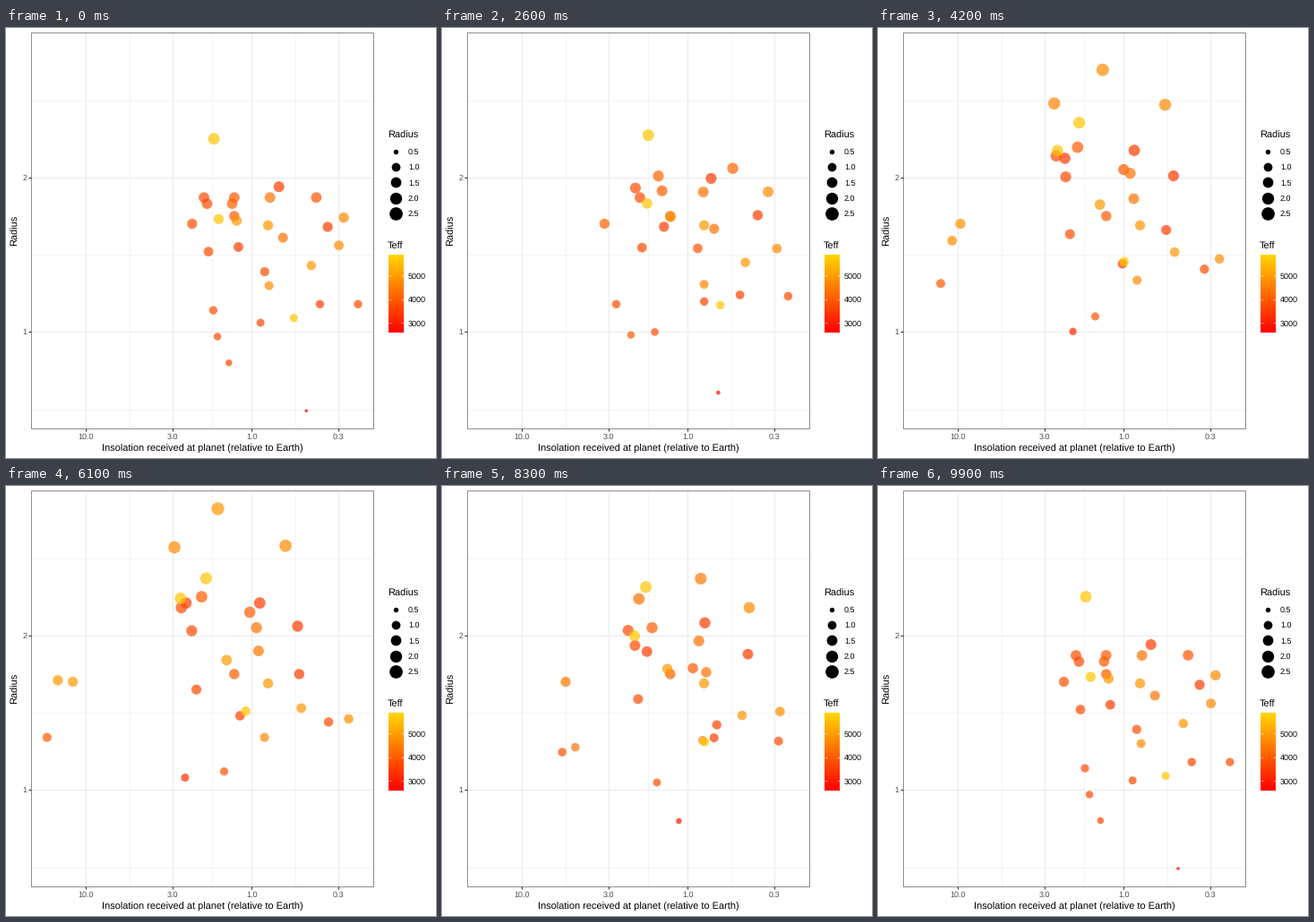
Write a matplotlib script that moves like this. It is 480 px wide and 480 px high and loops after 10 s.

```python
import numpy as np
import matplotlib.pyplot as plt
from matplotlib.animation import FuncAnimation
from matplotlib.patches import Rectangle

plt.rcParams["font.family"] = "Liberation Sans"
plt.rcParams["text.hinting"] = "none"

SIZE, DPI = 480, 72
FRAMES, INTERVAL = 100, 100
LEFT, RIGHT, TOP, BOTTOM = 28.2, 410.2, 5.2, 447.2
GREY20, GREY30, GREY92 = "#333333", "#4d4d4d", "#ebebeb"
DECADE = 185.2
T_LO, T_HI = 2600, 5880
R_LO, R_HI = 0.49, 2.82

# By star temperature: x in pixels, planet radius before and after
steady = {
    3500: [(259.4, 1.55, 2.21), (304.7, 1.94, 2.21), (359.1, 1.68, 2.06)],
    3750: [(221, 1.87, 2.18), (224.4, 1.83, 2.03), (226, 1.52, 1.65),
           (392.9, 1.18, 1.44)],
    4000: [(252.4, 1.83, 2.25), (254.8, 1.75, 1.75)],
    4350: [(294.7, 1.87, 2.05), (309.2, 1.61, 1.90)],
    4700: [(293.6, 1.30, 1.34), (371.6, 1.56, 1.46), (377, 1.74, 2.58)],
    4900: [(257.4, 1.72, 1.84), (292.6, 1.69, 1.69), (340.8, 1.43, 1.53)],
    5600: [(232, 2.25, 2.37), (237.4, 1.73, 2.24), (321.3, 1.09, 1.51)],
}
# Planets whose star is reclassified: (x, radius, temperature) before, after
revised = [
    ((335.3, 0.49, 2600), (199.9, 1.08, 3250)),
    ((284.1, 1.06, 3650), (327.3, 1.75, 3500)),
    ((350.4, 1.18, 3600), (261.2, 1.48, 3550)),
    ((248.8, 0.80, 3650), (57.9, 1.71, 4950)),
    ((236.0, 0.97, 3750), (243.5, 1.12, 3850)),
    ((231.4, 1.14, 3750), (45.8, 1.34, 3950)),
    ((207.8, 1.70, 3800), (74.6, 1.70, 4950)),
    ((288.8, 1.39, 3800), (272.1, 2.15, 4000)),
    ((254.8, 1.87, 3950), (188.0, 2.57, 4700)),
    ((346.4, 1.87, 3900), (236.5, 2.82, 4900)),
]


def rescaled(x, r1, r2, teff):
    """A larger star enlarges its planet and squares up the light it gives."""
    shift = 2.05 * DECADE * np.log10(r2 / r1)
    return (x, r1, teff), (x - shift, r2, teff)


planets = revised[:3] + [rescaled(*row, t) for t, rows in steady.items() for row in rows]
planets = revised[3:] + planets
before, after = np.array(planets, float).transpose(1, 0, 2)


def y_of(radius):
    return 166.8 - (radius - 2) * 172.5


def x_of(flux):
    return 274.4 - DECADE * np.log10(flux)


def diameter(radius):
    """Point diameter in pixels, area-scaled between sizes 1 and 6 mm."""
    mm = 1 + 5 * np.sqrt((radius - R_LO) / (R_HI - R_LO))
    return 0.75 * (mm * 2.845 + 0.945) + 0.8


def teff_rgb(teff):
    """Red to gold."""
    t = np.clip((np.asarray(teff, float) - T_LO) / (T_HI - T_LO), 0, 1)
    return np.stack([np.ones_like(t), t * 215 / 255, np.zeros_like(t)], -1)


fig = plt.figure(figsize=(SIZE / DPI, SIZE / DPI), dpi=DPI, facecolor="white")
ax = fig.add_axes([0, 0, 1, 1])
ax.axis("off")


def line(xs, ys, color, width, z=1):
    ax.plot(xs, ys, color=color, lw=width, zorder=z, solid_capstyle="butt")


def label(x, y, text, size=9, color="black", ha="left", **kw):
    ax.text(x, y, text, size=size, color=color, ha=ha, va="baseline", **kw)


def draw_panel():
    for r in (0.5, 1.5, 2.5):
        line([LEFT, RIGHT], [y_of(r)] * 2, GREY92, 0.53)
    xs = [x_of(v) for v in (10, 3, 1, 0.3)]
    for a, b in zip(xs, xs[1:]):
        line([(a + b) / 2] * 2, [TOP, BOTTOM], GREY92, 0.53)
    for r in (1, 2):
        y = y_of(r)
        line([LEFT, RIGHT], [y, y], GREY92, 1.07)
        line([LEFT - 2.75, LEFT], [y, y], GREY20, 1.07)
        label(23.6, y + 3.2, str(r), color=GREY30, ha="right")
    for x, text in zip(xs, ("10.0", "3.0", "1.0", "0.3")):
        line([x, x], [TOP, BOTTOM], GREY92, 1.07)
        line([x, x], [BOTTOM, BOTTOM + 2.75], GREY20, 1.07)
        label(x, 459.2, text, color=GREY30, ha="center")
    # The panel clips away the outer half of its border
    ax.add_patch(Rectangle((LEFT, TOP), RIGHT - LEFT, BOTTOM - TOP, fill=False,
                           ec=GREY20, lw=0.55, zorder=5, snap=True))
    label(219.3, 472.3, "Insolation received at planet (relative to Earth)", 11, ha="center")
    label(13.3, 226.3, "Radius", 11, ha="center", rotation=90, rotation_mode="anchor")


def draw_legends():
    label(426, 123, "Radius", 11)
    for i, r in enumerate((0.5, 1, 1.5, 2, 2.5)):
        y = 137.8 + 17.28 * i
        ax.scatter([435.3], [y], s=(diameter(r) + 1.1) ** 2, c="black", lw=0)
        label(449, y + 3.2, f"{r:.1f}")

    label(426, 247, "Teff", 11)
    x0, x1, y0, y1 = 427, 444, 253, 340
    ramp = teff_rgb(np.linspace(T_HI, T_LO, 300))[:, None, :]
    ax.imshow(ramp, extent=(x0, x1, y1, y0), aspect="auto", zorder=2)
    for t in (5000, 4000, 3000):
        y = y0 + (T_HI - t) / (T_HI - T_LO) * (y1 - y0)
        line([x0, x0 + 3.45], [y, y], "white", 0.5, 3)
        line([x1 - 3.45, x1], [y, y], "white", 0.5, 3)
        label(449, y + 3.2, str(t))


draw_panel()
draw_legends()
dots = ax.scatter(before[:, 0], y_of(before[:, 1]), lw=0, alpha=0.7, zorder=4)
ax.set_xlim(0, SIZE)
ax.set_ylim(SIZE, 0)


def ease(t):
    return (1 - np.cos(np.pi * np.clip(t, 0, 1))) / 2


def update(frame):
    # Hold, move out, hold, move back
    p = ease((frame - 16) / 34) - ease((frame - 67) / 33)
    x, r, teff = ((1 - p) * before + p * after).T
    d = (1 - p) * diameter(before[:, 1]) + p * diameter(after[:, 1])
    dots.set_offsets(np.column_stack([x, y_of(r)]))
    dots.set_sizes(d ** 2)
    dots.set_facecolors(teff_rgb(teff))
    return [dots]


anim = FuncAnimation(fig, update, frames=FRAMES, interval=INTERVAL,
                     repeat=True, repeat_delay=0)
plt.show()
```
